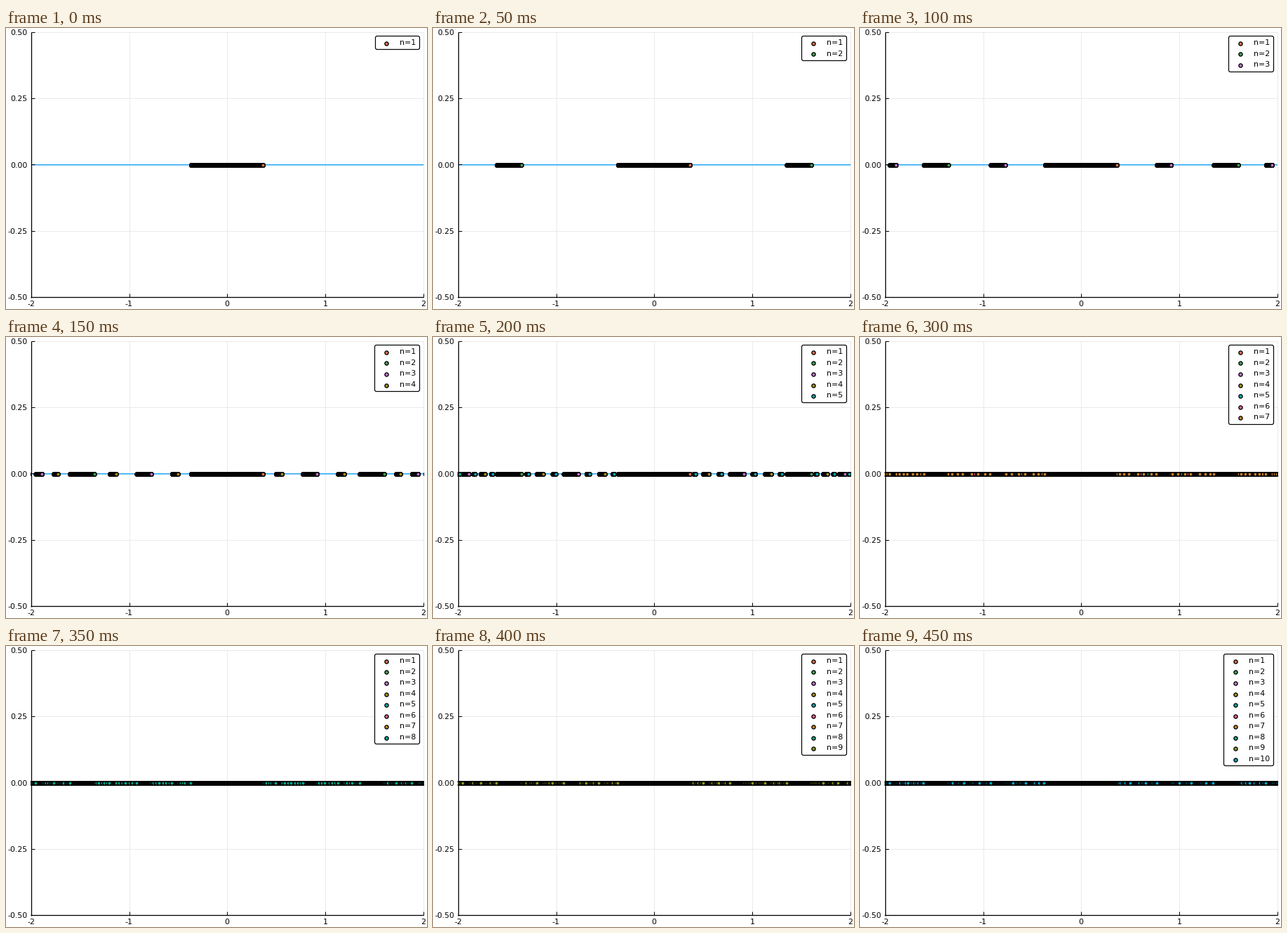
A matplotlib script for the animation above (500 ms loop, 600 px wide and 400 px high).

```python
import numpy as np
import matplotlib.pyplot as plt
from matplotlib.animation import FuncAnimation
from matplotlib.patches import FancyBboxPatch, Rectangle

W, H, DPI = 600, 400, 100
PT = 72 / DPI  # points per pixel
X0, Y0, SX, SY = 315.45, 194.45, 139.8, 377
LEFT, RIGHT = X0 - 2 * SX, X0 + 2 * SX
TOP, BOTTOM = Y0 - SY / 2, Y0 + SY / 2
DOT_Y = 195.5
ROW = 15.55
C = -2.2
STEPS = 10
GRID = "#e8e8e8"
COLORS = ["#e36f47", "#3ea44e", "#c371d2", "#ac8e18", "#00aaae",
          "#ed5e93", "#c68225", "#00a98d", "#8e971e", "#00a8cb"]

plt.rcParams["font.family"] = "DejaVu Sans"
fig = plt.figure(figsize=(W / DPI, H / DPI), dpi=DPI, facecolor="white")
ax = fig.add_axes([0, 0, 1, 1])
ax.set_xlim(0, W)
ax.set_ylim(H, 0)
ax.axis("off")


def line(xs, ys, color, width, z, snap=True):
    ax.plot(xs, ys, color=color, lw=width * PT, zorder=z, snap=snap,
            solid_capstyle="butt")


def label(x, y, text, ha, z=3):
    return ax.text(x, y, text, ha=ha, va="baseline", fontsize=11 * PT,
                   color="black", zorder=z)


def pixel_center(v):
    return np.floor(v) + 0.5


def dots(xs, ys, color, z):
    # one size per dot keeps the centres exact
    return ax.scatter(xs, ys, s=np.full(len(xs), (5.2 * PT) ** 2), c=color,
                      edgecolors="black", linewidths=1.3 * PT, zorder=z)


def escape_times(x):
    """Step at which x -> x^2 + C first leaves [-p, p]; 0 if it stays."""
    p = (1 + np.sqrt(1 - 4 * C)) / 2
    times = np.zeros(len(x), int)
    inside = np.abs(x) <= p
    y = x.copy()
    for n in range(1, STEPS + 1):
        y = np.where(inside, y * y + C, y)
        out = inside & (np.abs(y) > p)
        times[out] = n
        inside &= ~out
    return times


# Axes, grid and tick labels
for v in range(-2, 3):
    x = X0 + v * SX
    line([x, x], [TOP, BOTTOM], GRID, 0.9, 0)
    line([x, x], [BOTTOM - 5, BOTTOM], "black", 1, 2)
    label(x - 0.4, 396, str(v), "center")

    y = Y0 - v * SY / 4
    line([LEFT, RIGHT], [y, y], GRID, 0.9, 0)
    line([LEFT, LEFT + 5], [y, y], "black", 1, 2)
    label(30.3, y + 4.2, f"{v / 4:.2f}", "right")

line([LEFT, LEFT], [TOP, BOTTOM + 0.6], "black", 1.3, 2)
line([LEFT - 0.6, RIGHT], [BOTTOM, BOTTOM], "black", 1.3, 2)
line([LEFT, RIGHT], [194.8, 194.8], "#009afa", 1.3, 1, snap=False)

# Escaping points, grouped by step, with their legend entries
clip = Rectangle((35, TOP), 561, SY, transform=ax.transData)
grid = np.arange(-2.1, 2.1, 0.0005)
times = escape_times(grid)
box = FancyBboxPatch((525, 11.5), 64, 19,
                     boxstyle="round,pad=0,rounding_size=2.5",
                     fc="white", ec="black", lw=1.2 * PT, zorder=30)
ax.add_patch(box)
rows = 21.4 + ROW * np.arange(STEPS)

groups, keys, names = [], [], []
for n, (color, row) in enumerate(zip(COLORS, rows), 1):
    xs = pixel_center(X0 + SX * grid[times == n])
    group = dots(xs, np.full(len(xs), DOT_Y), color, 4 + n)
    group.set_clip_path(clip)
    groups.append(group)
    keys.append(dots([541.5], [pixel_center(row)], color, 31))
    names.append(label(561, row + 2.6, f"n={n}", "left", 31))


def update(i):
    count = i + 1
    shift = 7 if count == 10 else 0
    left = 526.5 if count == 1 else 525.5 - shift
    bottom = round(30.45 + ROW * i) + 0.5
    box.set_bounds(left, 11.5, 589.5 - left, bottom - 11.5)
    for j, (group, key, name) in enumerate(zip(groups, keys, names)):
        for artist in (group, key, name):
            artist.set_visible(j < count)
        key.set_offsets([[541.5 - shift, pixel_center(rows[j])]])
        name.set_x(561 - shift)
    return [box, *groups, *keys, *names]


anim = FuncAnimation(fig, update, frames=STEPS, interval=50, repeat=True,
                     repeat_delay=0, blit=False)
plt.show()
```
